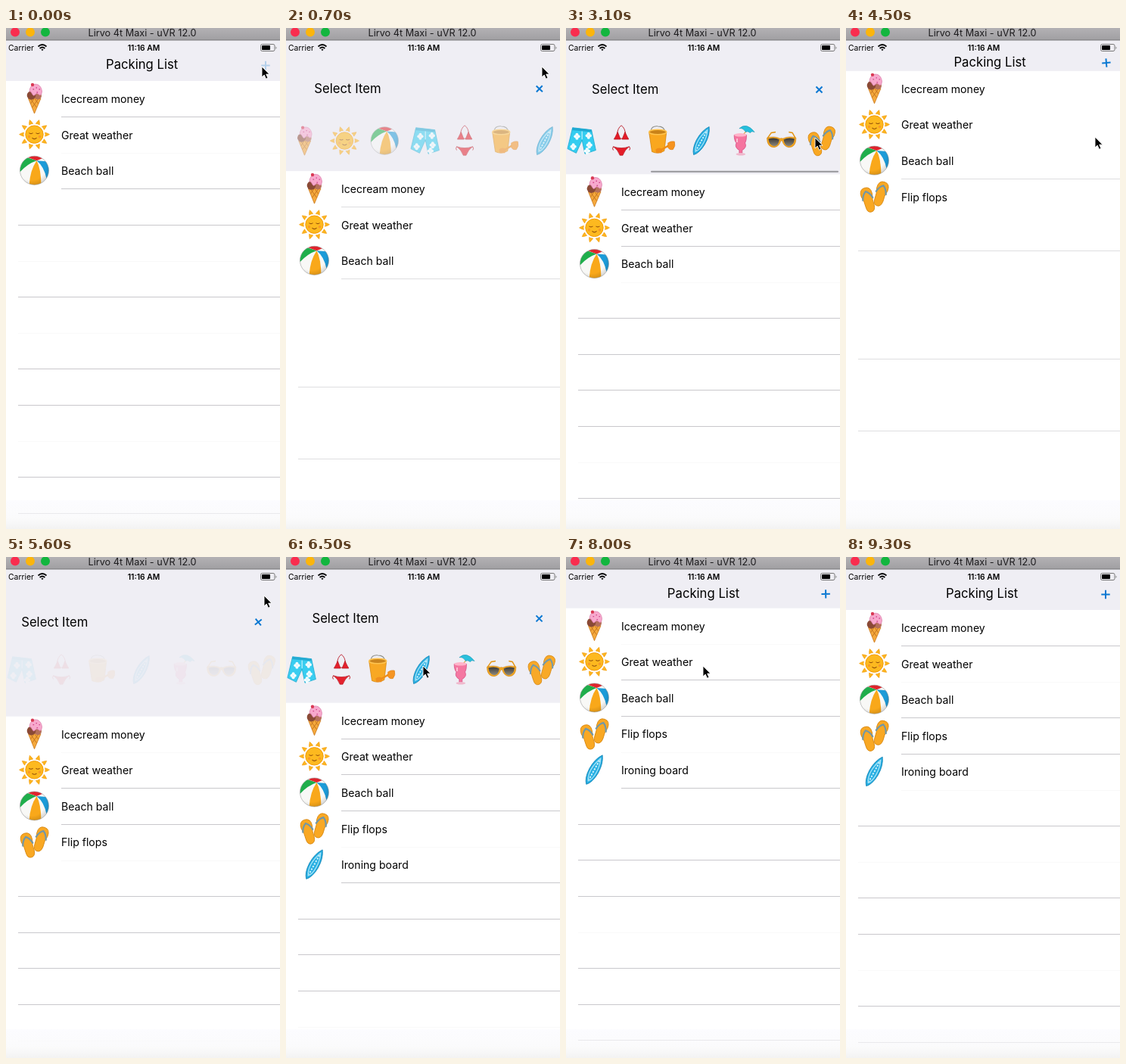
Animation of 362 by 662 pixels, one loop 9.4 s. Source, as an HTML page:

```html
<!DOCTYPE html>
<html lang="en">
<head>
<meta charset="utf-8">
<title>Packing List</title>
<style>
html, body { margin: 0; width: 100%; height: 100%; overflow: hidden; background: #fff; }
svg { display: block; width: 362px; height: 662px; font-family: Inter, Roboto, sans-serif; }
.row { font-size: 14.1px; fill: #000; }
.title { font-size: 16.7px; fill: #000; }
</style>
</head>
<body>
<svg id="stage" viewBox="0 0 362 662" xmlns="http://www.w3.org/2000/svg">
<defs>
  <linearGradient id="bar" x2="0" y2="1"><stop stop-color="#b3b1b4"/><stop offset="1" stop-color="#a09fa2"/></linearGradient>
  <linearGradient id="foot" x2="0" y2="1"><stop stop-color="#fafaff" stop-opacity=".6"/><stop offset=".6" stop-color="#f9f9fa" stop-opacity=".7"/><stop offset="1" stop-color="#f1f1f1" stop-opacity=".9"/></linearGradient>
  <linearGradient id="lens" x2="0" y2="1"><stop stop-color="#3a3835"/><stop offset="1" stop-color="#8b877c"/></linearGradient>
  <radialGradient id="shade" cx=".4" cy=".35" r=".7"><stop offset=".7" stop-opacity="0"/><stop offset="1" stop-opacity=".16"/></radialGradient>
  <clipPath id="round"><circle r="19"/></clipPath>
  <clipPath id="titleClip"><rect id="titleBox" y="0" height="200"/></clipPath>

  <g id="cone">
    <path d="M-8 0H8.500L0 20Z" fill="#f5a93c" stroke="#c9781c" stroke-width=".8"/>
    <path d="M-5 1 3 12M1 1 5 7M5 1-3 12M-1 1-5 7" stroke="#b96a1a" stroke-width=".8"/>
    <circle cx="4.500" cy="-3.500" r="5" fill="#b5705a"/>
    <circle cx="-4" cy="-4" r="5.800" fill="#8a4a36"/>
    <path d="M-6.500-9C-6-22 9-22 10-9Q9-2 6-5T1-5T-3-6T-6.500-9Z" fill="#f7a9cd" stroke="#d777a6" stroke-width=".7"/>
    <path d="M-2-12h1.600M3-8h1.600M6-12h1.500M2-14h1.500" stroke="#d0448b" stroke-width="1.300"/>
    <circle cx="-2.500" cy="-18" r="2.200" fill="#d93a55"/>
  </g>
  <g id="sun">
    <g id="rays" fill="#fcb51e" stroke="#f39c0a" stroke-width=".6"></g>
    <circle r="11.700" fill="#fdb91f" stroke="#f29b09"/>
    <path d="M-7-2q2.500 2 5 0M2-2q2.500 2 5 0M-3 4.500q3 3 6 0" fill="none" stroke="#94510a" stroke-width="1.100"/>
    <circle cx="-7" cy="3" r="1.800" fill="#f89a2a"/><circle cx="7" cy="3" r="1.800" fill="#f89a2a"/>
  </g>
  <g id="ball">
    <g clip-path="url(#round)">
      <circle r="19" fill="#f8f8f6"/>
      <path d="M3-13Q-9-9-19 2L-24-6-12-18Z" fill="#1fae4b"/>
      <path d="M3-13Q-6 0-7 21H9Q9-2 3-13Z" fill="#f9a81a"/>
      <path d="M3-13Q13-5 16 11L24 4 16-12Z" fill="#1c9bd8"/>
      <path d="M3-13-8-17 0-24 13-17Z" fill="#e0242c"/>
    </g>
    <circle r="19" fill="url(#shade)" stroke="#999" stroke-width=".6"/>
  </g>
  <g id="shorts">
    <path d="M-12-18 14-15 20 13 5 18 1-1-7 17-19 11Z" fill="#34cdf0" stroke="#18a6cc" stroke-width=".8"/>
    <path d="M-12-18 14-15 14.500-12-13-14.500Z" fill="#1fa9d2"/>
    <g fill="#f2fdff"><use href="#bloom" x="-11" y="8"/><use href="#bloom" x="11" y="6"/><use href="#bloom" x="-6" y="-6"/><use href="#bloom" x="8" y="14"/><use href="#bloom" x="10" y="-7"/></g>
    <path d="M1-13V-2" stroke="#e5f8fd"/>
  </g>
  <g id="bloom"><circle cx="-2.200" r="2.100"/><circle cx="2.200" r="2.100"/><circle cy="-2.600" r="2.100"/><circle cy="2.600" r="2.100"/></g>
  <g id="bikini">
    <path d="M-6-8Q-5-18 0-21Q5-18 6-8M-10-3H10" fill="none" stroke="#b8101c" stroke-width=".9"/>
    <path d="M-5-12-10-2H-1ZM5-12 10-2H1ZM-11 8Q0 12 11 8Q5 12 2 20H-2Q-5 12-11 8Z" fill="#e41c28" stroke="#b3111b" stroke-width=".7"/>
    <path d="M-11 8q-2 3 0 5M11 8q2 3 0 5" fill="none" stroke="#b8101c"/>
  </g>
  <g id="bucket">
    <path d="M-15-12Q-14-21-5-20Q4-20 5-12" fill="none" stroke="#8d8f8a" stroke-width="1.200"/>
    <path d="M-17-12H7L4 14Q-5 19-13 15Z" fill="#f9a71f" stroke="#d3830d" stroke-width=".8"/>
    <ellipse cx="-5" cy="-12" rx="12" ry="3.300" fill="#c98218" stroke="#ffc34d" stroke-width="1.600"/>
    <path d="M-1 13 11 6" stroke="#f08c12" stroke-width="2.600"/>
    <path d="M9 3Q13 0 18 1Q20 7 16 12Q11 13 9 9Z" fill="#f6931f" stroke="#d97a0c" stroke-width=".6"/>
    <path d="M-8 12Q-3 8 2 12L0 17H-7Z" fill="#f08c18"/>
  </g>
  <g id="board">
    <g transform="rotate(29)">
      <path d="M0-22Q6.500-13 6.500 2Q6 16 0 22Q-6 16-6.500 2Q-6.500-13 0-22Z" fill="#26aee2" stroke="#1585b5" stroke-width=".8"/>
      <path d="M0-17Q4-9 4 2T0 17Q-4 11-4 2T0-17Z" fill="none" stroke="#aee6f8" stroke-width="1.200"/>
      <path d="M0-14V15" stroke="#c9f0fb" stroke-width="2" stroke-dasharray="2.500 1.500"/>
    </g>
  </g>
  <g id="drink">
    <path d="M2-8 9-16" stroke="#d9a33e" stroke-width="1.200"/>
    <path d="M-3-17Q7-26 18-12Q14-14 12-11Q8-14 6-12Q2-18-3-17Z" fill="#25bfdc" stroke="#1594b3" stroke-width=".6"/>
    <path d="M-10-8H7Q7 0 5 3Q8 9 1 13V17H-3V13Q-10 9-7 3Q-10 0-10-8Z" fill="#f5749f" stroke="#d44d80" stroke-width=".8"/>
    <ellipse cx="-1.500" cy="-8" rx="8.500" ry="2.400" fill="#ffb3c9"/>
    <ellipse cx="-1" cy="18.500" rx="6.500" ry="1.800" fill="#efb8cc"/>
    <path d="M-6-3V2" stroke="#ffd3e0" stroke-width="1.600"/>
  </g>
  <g id="shades">
    <path d="M-19-4-14-11-8-12M19-4 15-11 10-12" fill="none" stroke="#e3930f" stroke-width="1.500"/>
    <path d="M-20-4Q-10-7-2-3Q0-4 2-3Q10-7 20-4Q20 9 10 9Q3 8 1 0H-1Q-3 8-10 9Q-20 9-20-4Z" fill="#f4a51d" stroke="#c97f0b" stroke-width=".6"/>
    <path d="M-18-2.500Q-9-5-3-1.500Q-4 7-10 7.500Q-17 7-18-2.500ZM18-2.500Q9-5 3-1.500Q4 7 10 7.500Q17 7 18-2.500Z" fill="url(#lens)"/>
  </g>
  <g id="sole">
    <path id="pad" d="M0-16Q8-16 7.500-6Q5 2 6 9Q5.500 17 0 17Q-5.500 17-5.500 9Q-5 2-7.500-6Q-8-16 0-16Z"/>
    <path d="M-7 0Q-5-8 0-11Q5-8 7 0" fill="none" stroke="#7297a6" stroke-width="2.200"/>
  </g>
  <g id="flops" fill="#f9a823" stroke="#d5850d" stroke-width=".8"><use href="#sole" transform="translate(-8.500 4) rotate(-16)"/><use href="#sole" transform="translate(8.500 -4) rotate(18)"/></g>
</defs>

<rect width="362" height="662" fill="#fff"/>
<g id="lines"></g>
<g id="rows"></g>
<rect y="624" width="362" height="38" fill="url(#foot)"/>
<rect id="head" y="16" width="362" fill="#efeef4"/>
<g id="picker"></g>
<rect id="thumb" y="188.700" width="248" height="2" rx="1" fill="#97969b"/>
<g clip-path="url(#titleClip)"><text id="title" class="title"></text></g>
<path id="plus" d="M-5.700 0H5.700M0-5.700V5.700" stroke="#0a78d2" stroke-width="2"/>

<text x="3" y="30" font-size="10.400">Carrier</text>
<g fill="none" stroke="#000" stroke-width="1.700"><path d="M42.500 24.500Q48 19.500 53.500 24.500M44.600 27Q48 24 51.400 27"/><path d="M46.500 28.500 48 30.200 49.500 28.500Q48 27.200 46.500 28.500Z" fill="#000" stroke="none"/></g>
<text x="182" y="30" font-size="10.300" font-weight="600" text-anchor="middle">11:16 AM</text>
<rect x="336.500" y="21.500" width="18.500" height="9" rx="2" fill="none" stroke="#777"/>
<rect x="338" y="23" width="11" height="6" rx=".8"/>
<path d="M356.500 24.500q2 1.500 0 3.500z" fill="#777"/>

<rect width="362" height="16" fill="url(#bar)"/>
<rect y="15.500" width="362" height="1" fill="#79787b"/>
<circle cx="12" cy="5.500" r="6" fill="#f92d4e"/><circle cx="32" cy="5.500" r="6" fill="#fbb50d"/><circle cx="52" cy="5.500" r="6" fill="#12b63e"/>
<text x="180" y="11" font-size="12.700" fill="#1c1b1d" text-anchor="middle">Lirvo 4t Maxi - uVR 12.0</text>

<path id="cursor" d="M0 0V14L3.200 11 5.500 16.200 8 15.100 5.700 10.100H10Z" fill="#000" stroke="#fff" stroke-width=".9"/>
</svg>
<script>
const $ = id => document.getElementById(id);
const LOOP = 9400, STEP = 100;
const CLOSED = 70, TRAVEL = 123.27, ROW = 47.61, GAP = 52.9, SCROLL = 163;
const toggles = [74, 4128, 5405, 7213];
const items = [
  ['cone', 'Icecream money', 0], ['sun', 'Great weather', 0], ['ball', 'Beach ball', 0],
  ['flops', 'Flip flops', 3150], ['board', 'Ironing board', 6250]
];
const choices = ['cone', 'sun', 'ball', 'shorts', 'bikini', 'bucket', 'board', 'drink', 'shades', 'flops'];
const pointer = [
  [0, 338, 51], [1200, 338, 51], [1800, 318, 145], [2150, 318, 145], [2650, 155, 145],
  [3050, 329, 145], [4700, 329, 144], [5200, 341, 51], [5700, 341, 51],
  [6150, 181, 144], [9050, 181, 144], [9250, 150, -24], [LOOP, 150, -24]
];

const clamp = x => Math.min(1, Math.max(0, x));
const ease = x => (x = clamp(x), x * x * (3 - 2 * x));
const set = (el, attrs) => { for (const k in attrs) el.setAttribute(k, attrs[k]); };
const repeat = (n, fn) => Array.from({ length: n }, (_, i) => fn(i)).join('');

// Underdamped step response, time in seconds.
function spring(s) {
  const decay = 5, freq = 11.9;
  return s <= 0 ? 0 : 1 - Math.exp(-decay * s) * (Math.cos(freq * s) + decay / freq * Math.sin(freq * s));
}

$('rays').innerHTML = repeat(10, i => `<path d="M-2.600-14Q0-15 2.600-14Q2-17 0-20Q-2-17-2.600-14Z" transform="rotate(${i * 36 + 18})"/>`);
$('lines').innerHTML = repeat(13, () => '<rect width="362" height="1" fill="#c9c8cc"/>');
$('rows').innerHTML = items.map(([icon, label], i) =>
  `<g><use href="#${icon}" x="37.500" y="${23 + i * ROW}"/><text class="row" x="73" y="${29 + i * ROW}">${label}</text></g>`).join('');
$('picker').innerHTML = choices.map((icon, i) =>
  `<use href="#${icon}" transform="translate(${24.5 + i * GAP} 149) scale(.96)"/>`).join('');
const lines = [...$('lines').children], rows = [...$('rows').children];

function pointerAt(t) {
  const i = pointer.findIndex(k => k[0] > t);
  const [t0, x0, y0] = pointer[i - 1], [t1, x1, y1] = pointer[i];
  const k = ease((t - t0) / (t1 - t0));
  return [x0 + (x1 - x0) * k, y0 + (y1 - y0) * k];
}

function draw(t) {
  const last = toggles.filter(s => s <= t).length - 1;
  const open = last >= 0 && last % 2 === 0;
  const since = last < 0 ? 0 : t - toggles[last];
  const k = spring(since / 1000);
  const p = last < 0 ? 0 : open ? k : 1 - k;
  const bottom = CLOSED + TRAVEL * p;

  set($('head'), { height: bottom - 16 });
  set($('rows'), { transform: `translate(0 ${bottom})` });
  rows.forEach((row, i) => set(row, { display: t >= items[i][2] ? 'inline' : 'none' }));
  const count = items.filter(item => t >= item[2]).length;

  // Hairlines drop out between sampled pixels, more of them while the table settles.
  const settling = since > 300 && since < 700;
  const cutoff = settling ? .6 : .3, shown = settling ? .6 : 1, dropped = settling ? 0 : .12;
  lines.forEach((line, i) => {
    const y = bottom + ROW * (i + 1), whole = Math.floor(y);
    set(line, { x: i < count ? 73 : 16, y: whole, opacity: y - whole < cutoff ? dropped : shown });
  });

  const width = 96 - 7 * p, left = 180 - 101.5 * p - width / 2;
  set($('titleBox'), { x: left, width: width + 1 });
  set($('title'), { x: left, y: 54.4 + 33 * p });
  $('title').textContent = open ? 'Select Item' : 'Packing List';

  const pressed = toggles.some((s, i) => i % 2 === 0 && t < s && t >= s - 90);
  set($('plus'), {
    transform: `translate(${343 - 8.5 * p} ${49.5 + 32 * p}) rotate(${45 * p})`,
    opacity: pressed ? .25 : 1
  });

  const moved = SCROLL * ease((t - 2150) / 600);
  set($('picker'), { transform: `translate(${-moved} 0)`, opacity: open ? ease(since / 1220) : 0 });
  set($('thumb'), {
    x: 2 + 110 * moved / SCROLL,
    opacity: clamp((t - 2130) / 100) * clamp((3400 - t) / 250)
  });

  set($('cursor'), { transform: `translate(${pointerAt(t)})` });
}

const start = performance.now();
function tick() {
  const t = (performance.now() - start) % LOOP;
  draw(Math.floor(t / STEP) * STEP);
  requestAnimationFrame(tick);
}
tick();
</script>
</body>
</html>
```
